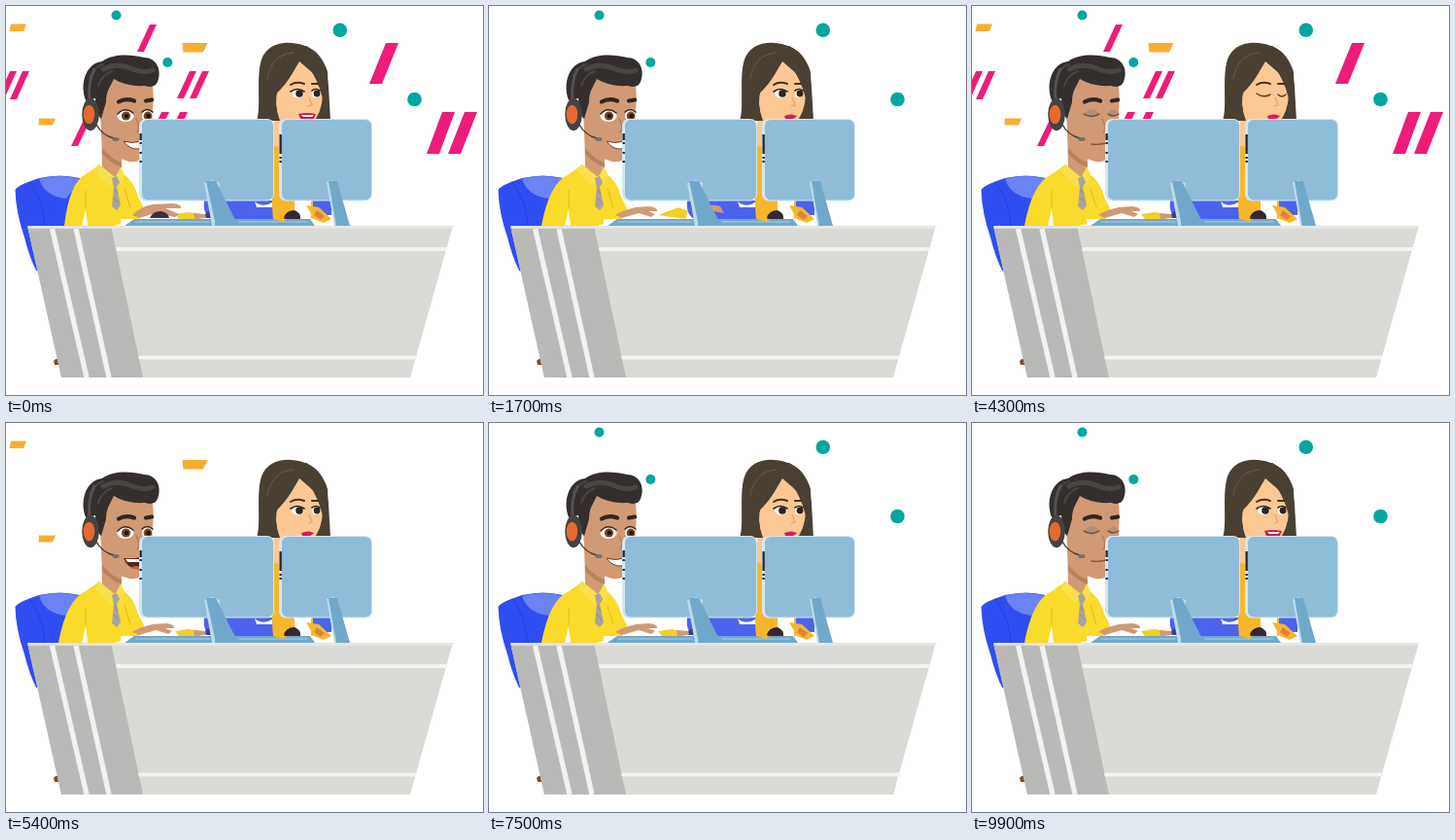
Animation, 491 px wide and 400 px high, one loop 10000 ms. Source, as an HTML page:

```html
<!DOCTYPE html>
<html lang="en">
<head>
<meta charset="utf-8">
<title>Help desk</title>
<style>
html, body { margin: 0; width: 100%; height: 100%; overflow: hidden; background: #fff; }
svg { display: block; width: 491px; height: 400px; }
.teal { fill: #00a79d; }
.pink { fill: #ed1c78; }
.gold { fill: #f9ae30; }
.skin { fill: #d19a75; }
.pale { fill: #fbc793; }
.locks { fill: #494033; }
.screen { fill: #8fbcd8; }
.steel { fill: #70a8cb; }
.line { fill: none; stroke-linecap: round; stroke-linejoin: round; }
</style>
</head>
<body>
<svg viewBox="0 0 491 400">
  <g id="teal" class="teal">
    <circle cx="113.5" cy="9.5" r="5"/><circle cx="166.3" cy="58" r="5"/>
    <circle cx="343.8" cy="24.8" r="7.3"/><circle cx="420.5" cy="96" r="7.3"/>
  </g>
  <g id="pink" class="pink"></g>
  <g id="gold" class="gold">
    <path d="M5 18.500H21L18 26H3.500Z"/>
    <path d="M181.500 38H207.500L203 47.500H182.500Z"/>
    <path d="M34 115.500H51L48 122.500H33.500Z"/>
  </g>

  <!-- chair -->
  <path fill="#2f4ef2" d="M9.500 189Q12 184 34 177Q56 172 76 177L90 235L45 276L31 272Q24 258 19 238Q10 212 9.500 189Z"/>
  <path fill="#6a83f5" d="M34 178Q54 172 77 178L62 198Q40 196 34 178Z"/>
  <path class="line" stroke="#2440dc" d="M24 181C33 194 38 205 40 226"/>
  <path fill="#8a4a24" d="M49 365Q51 362 55 363L56 369H50Z"/>

  <!-- man -->
  <g id="man">
    <path class="skin" d="M98 120H119V166L113 177L99 168Z"/>
    <path id="shirt" fill="#fada2b"/>
    <path fill="#fff" d="M78 226L82 209L84 226Z"/>
    <path class="line" stroke="#e3bb1d" d="M82 190V208M122 188L128 207"/>
    <path class="skin" d="M99 158H118V168L112 176L99 167Z"/>
    <path fill="#b98360" d="M99 146Q109 158 119 161V166Q108 162 99 152Z"/>
    <path class="skin" d="M96 96L107 72L150 77C153 90 151 102 151 116L144 150Q139 162 127 160Q109 156 99 142Z"/>
    <path fill="#fae04b" d="M95 162L112 176L107 186L92 171ZM118 165L113 176L119 184L122 173Z"/>
    <path fill="#a9a2a4" d="M109 177L114 175L117 181L114 186L118 205L114 210L109 206L111 186Z"/>
    <path class="line" stroke="#8f898c" d="M112 189L115 193M111 197L116 202"/>
    <path fill="#342f2d" d="M82 97C75 78 84 58 99 57C111 48 130 50 142 53C155 53 161 66 156 78Q153 85 143 82C128 83 118 79 111 75C107 84 103 87 103 99L98 116Q92 112 92 95Z"/>
    <path class="line" stroke="#4b4542" stroke-width="5" d="M100 65Q114 58 128 64T151 66"/>
    <path class="line" stroke="#4b4542" stroke-width="2" d="M87 72Q92 62 100 60M95 82Q99 70 109 67"/>
    <path class="line" stroke="#555152" stroke-width="3" d="M91 65Q84 78 86 98"/>
    <ellipse cx="87" cy="111.500" rx="8.800" ry="16.700" fill="#454243"/>
    <ellipse cx="85.500" cy="111.500" rx="5.800" ry="9.800" fill="#e46a2d"/>
    <path class="line" stroke="#44403f" stroke-width="1.500" d="M93 122Q99 133 111 136"/>
    <ellipse cx="113" cy="137" rx="3.700" ry="2" fill="#77706c"/>
    <path class="line" stroke="#b57d59" stroke-width="1.500" d="M134 116Q139 126 135 130"/>
    <path id="manBrow" class="line" stroke="#33251f" stroke-width="4.300" d="M116 100Q123 96 132 99M144 99L150 98"/>
    <g id="manOpen">
      <g fill="#fff"><ellipse cx="123" cy="113" rx="8.500" ry="6"/><ellipse cx="145.500" cy="113" rx="5.500" ry="5.700"/></g>
      <g fill="#774522"><circle cx="123.500" cy="113" r="4.600"/><circle cx="146" cy="113" r="4.400"/></g>
      <g fill="#21150f"><circle cx="124" cy="113" r="2.300"/><circle cx="146.500" cy="113" r="2.300"/></g>
      <path class="line" stroke="#42291d" stroke-width="1.500" d="M115 111Q122 103 131 110M140 109Q145 104 151 109"/>
    </g>
    <path id="manLid" fill="#b98967" d="M114 106H132V110H114ZM139 106H151V110H139Z"/>
    <g id="manShut">
      <path fill="#b58d74" d="M115 111Q122 102 131 110Q124 117 115 111ZM140 110Q145 103 151 110Q146 116 140 110Z"/>
      <path class="line" stroke="#6b4837" stroke-width="1.400" d="M115 111Q123 116 131 111M140 111Q145 115 151 111"/>
    </g>
    <path id="manSmile" fill="#fff" stroke="#7a3d2f" d="M121 139Q130 142 139 139L137 147Q127 148 121 139Z"/>
    <g id="manTalk">
      <path fill="#4f2824" d="M121 139Q130 140 139 138V150Q126 152 121 139Z"/>
      <path fill="#fff" d="M123 140H139V143H125Z"/><path fill="#b96556" d="M129 148Q134 146 139 148V150H132Z"/>
    </g>
    <path id="manFlat" class="line" stroke="#8a5140" stroke-width="1.400" d="M123 142Q130 143 138 141"/>
  </g>

  <!-- woman -->
  <g id="woman">
    <path fill="#4b63ec" d="M204 200H335V215H315V220H215Q202 217 204 200Z"/>
    <path fill="#f6b72c" d="M270 139L291 128L316 142V219H275Z"/>
    <path fill="#fff" d="M256 201Q264 208 274 202V207H258ZM297 199H314V219H297Z"/>
    <path class="locks" d="M258 118C263 104 257 73 263 55C270 35 296 34 314 44C327 51 330 66 332 83L334 118Z"/>
    <path class="pale" d="M276 116L300 101V139L286 147L275 143Z"/>
    <path class="pale" d="M277 91C288 82 295 69 302 57Q313 66 324 77L326 92Q325 109 316 120H280Z"/>
    <path class="locks" d="M262 118V60L275 44L309 41Q326 50 331 68L333 117H328Q329 84 306 55L298 52Q294 76 280 86Q275 100 282 118Z"/>
    <path class="line" stroke="#5d5243" stroke-width="1.300" d="M269 74C273 56 282 49 296 48"/>
    <path class="line" stroke="#443126" stroke-width="2" d="M293 81Q299 77 307 80M315 80L321 80"/>
    <path class="line" stroke="#e1a373" stroke-width="1.200" d="M312 94L315 102L311 103"/>
    <g id="womanOpen">
      <g fill="#fff"><ellipse cx="300.500" cy="90" rx="6.300" ry="4.500"/><ellipse cx="319" cy="90" rx="4" ry="4.200"/></g>
      <g fill="#30231e"><circle cx="302" cy="90" r="3.800"/><circle cx="320" cy="90" r="3.400"/></g>
      <path class="line" stroke="#2b211d" stroke-width="1.600" d="M293 88Q300 83 307 88M315 87Q319 84 323 87"/>
    </g>
    <path id="womanShut" class="line" stroke="#5c4032" stroke-width="1.500" d="M293 90Q300 95 307 91M315 91Q319 95 323 91"/>
    <path id="womanRest" fill="#d71b5c" d="M304 113Q309 111 312 111.500L317 113Q313 118 305 116Z"/>
    <g id="womanTalk">
      <path fill="#c51c57" d="M301 111Q309 109 319 111L316 118H304Z"/><path fill="#fff" d="M304 112H317L315 114H306Z"/>
    </g>
  </g>

  <!-- things on the desk -->
  <path fill="#fff" d="M118 219H345V227H118Z"/>
  <path class="steel" d="M132 219H215L218 226H122ZM233 219H313L318 226H238Z"/>
  <path class="line" stroke="#a9d0e3" d="M133 222H209M240 222H310"/>
  <path fill="#f6b72c" d="M274 201L287 203L291 218L285 222L275 219ZM309 205L322 207L335 219L327 223L317 219Z"/>
  <path fill="#352731" d="M286 218Q288 210 297 210Q304 213 303 219H287Z"/>
  <path fill="#e0813c" d="M320 210L328 216L324 220L317 215Z"/>
  <path id="puck" fill="#3c3f86" d="M204 218Q205 211 210 211Q216 213 215 218Z"/>
  <g id="sleeve">
    <path fill="#f4cf25" d="M174 214L188 212L200 214V219H178Z"/>
    <path class="skin" d="M193 213L205 214L206 218L194 219Z"/>
  </g>
  <g id="reach">
    <path fill="#f4cf25" d="M174 215L195 207L205 211L202 219Z"/>
    <path class="skin" d="M210 211Q223 202 238 206L242 213L231 211L225 217Z"/>
  </g>
  <path id="hand" class="skin"/>
  <path id="lifted" fill="#39314a" d="M148 218Q151 211 159 211Q167 212 168 218Z"/>

  <!-- monitors -->
  <g id="screens"></g>
  <path fill="#bcdcea" d="M204 182L213 179L220 182L215 226H212Z"/>
  <path class="steel" d="M206 180H216L239 226H216Z"/>
  <path fill="#bcdcea" d="M330 181L337 179L342 226H338Z"/>
  <path class="steel" d="M332 180H341L354 226H340Z"/>

  <!-- desk -->
  <path fill="#dadad6" d="M22 226H460L416 382H57Z"/>
  <path fill="#b9b9b7" d="M22 226H108L141 382H57Z"/>
  <path fill="none" stroke="#f2f2f0" stroke-width="5.300" d="M47.500 229L83 382M72 229L106 382"/>
  <path class="line" stroke="#f4f4f2" stroke-width="3.800" d="M115 250H453M138 361.500H421"/>
  <path class="line" stroke="#e8e8e5" stroke-width="2.500" d="M24 227.500H458"/>
</svg>
<script>
const $ = id => document.getElementById(id);
const show = (id, on) => { $(id).style.display = on ? "" : "none"; };
const mix = (a, b, k) => a + (b - a) * k;

// top-left x, top y, width, height, slant
const bars = [
  [148, 19, 7, 28, 13], [4, 67, 7, 29, 13], [17, 67, 7, 29, 13],
  [189, 67, 7, 28, 13], [202, 67, 7, 28, 13], [80, 117, 7, 27, 13],
  [160, 109, 8, 28, 13], [179, 109, 8, 28, 13],
  [391, 38, 13, 42, 17], [449, 109, 13, 43, 16], [472, 109, 13, 43, 17]
];
$("pink").innerHTML = bars.map(([x, y, w, h, s]) =>
  `<path d="M${x} ${y}h${w}l${-s} ${h}h${-w}Z"/>`).join("");

const monitor = (x, w, ports) =>
  `<rect x="${x - 1}" y="116" width="${w}" height="84.500" rx="7" fill="#d3e7f1"/>
   <rect x="${x + 2}" y="117" width="${w - 4}" height="82.500" rx="6" class="screen"/>` +
  ports.map(([y, h]) => `<rect x="${x - .5}" y="${y}" width="2.300" height="${h}" fill="#24272d"/>`).join("");
$("screens").innerHTML =
  monitor(138, 139, [[131, 7], [140, 2], [150, 2], [159, 2]]) +
  monitor(282, 96, [[132, 20], [155, 2], [159, 2]]);

// each entry holds until the next one
const mouths = [
  [0, "Smile"], [600, "Talk"], [900, "Flat"], [1200, "Talk"], [1500, "Smile"],
  [2100, "Talk"], [2400, "Smile"], [2700, "Talk"], [3200, "Smile"], [3500, "Talk"],
  [3900, "Flat"], [4800, "Smile"], [5200, "Talk"], [5600, "Smile"], [6000, "Flat"],
  [7000, "Talk"], [7400, "Smile"], [7800, "Flat"], [8200, "Talk"], [8700, "Smile"],
  [9200, "Talk"], [9500, "Flat"]
];
const at = (list, t) => list.filter(item => item[0] <= t).pop()[1];
const within = (spans, t) => spans.some(([a, b]) => t >= a && t < b);

const manBlinks = [[2800, 3100], [4200, 4500], [5700, 5900], [7200, 7400], [9800, 10000]];
const womanBlinks = [[2000, 2200], [4200, 4500], [7300, 7500], [9200, 9400]];
const womanTalks = [[0, 400], [900, 1200], [2300, 2600], [5000, 5300], [7000, 7200], [8200, 8700], [9700, 10000]];

function drawMan(t) {
  const k = Math.min(1, Math.max(0, (t - 200) / 400));
  const ease = k * k * (3 - 2 * k);
  const left = mix(60, 54, ease);
  $("shirt").setAttribute("d",
    `M${left} 226Q${mix(65, 62, ease)} 182 82 173L95 164L119 171Q132 180 136 196L142 208L137 219L111 226Z`);
  const y = mix(204, 207, ease), tip = mix(181, 174, ease);
  $("hand").setAttribute("d",
    `M130 215Q137 ${y + 3} 151 ${y}L${tip - 9} ${y - 1}Q${tip} ${y} ${tip - 1} ${y + 4}L164 ${y + 4}L${tip - 3} 214L${tip - 7} 217L154 213L137 218Z`);
  show("lifted", ease < .5);
  const reaching = within([[1500, 2000]], t);
  show("reach", reaching);
  show("sleeve", !reaching);
  show("puck", !reaching);

  const shut = within(manBlinks, t), calm = within([[6000, 6900]], t);
  show("manOpen", !shut);
  show("manShut", shut);
  show("manLid", calm && !shut);
  $("manBrow").setAttribute("transform", `translate(0 ${calm ? 0 : -1.5})`);
  const mouth = at(mouths, t);
  for (const name of ["Smile", "Talk", "Flat"]) show("man" + name, name === mouth);
}

function drawWoman(t) {
  const shut = within(womanBlinks, t), talk = within(womanTalks, t);
  show("womanOpen", !shut);
  show("womanShut", shut);
  show("womanTalk", talk);
  show("womanRest", !talk);
}

function frame(now) {
  const t = Math.floor((now % 10000) / 100) * 100;
  const phase = Math.floor(t / 500) % 4;
  ["pink", "gold", "teal"].forEach((id, i) => show(id, phase === 0 || phase === i + 1));
  drawMan(t);
  drawWoman(t);
  requestAnimationFrame(frame);
}
frame(performance.now());
</script>
</body>
</html>
```
